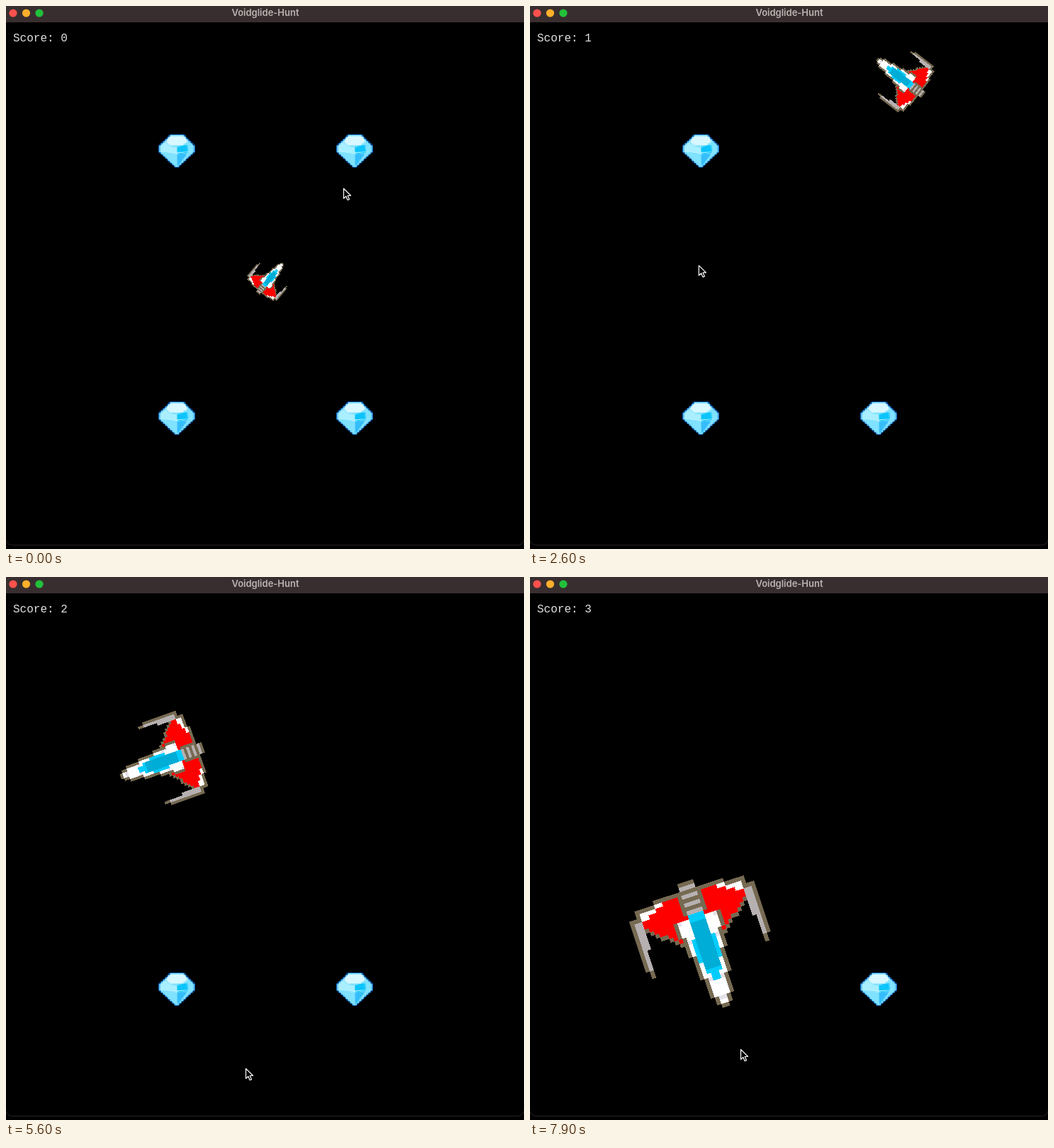
Write an HTML page with a canvas that moves like this. It is 731 px wide and 766 px high and loops after 8 s.

```html
<!DOCTYPE html>
<html lang="en">
<head>
<meta charset="utf-8">
<title>Voidglide-Hunt</title>
<style>
html, body { margin: 0; width: 100%; height: 100%; overflow: hidden; background: #000; }
canvas { display: block; }
</style>
</head>
<body>
<canvas id="stage" width="731" height="766"></canvas>
<script>
const ctx = document.getElementById('stage').getContext('2d');
const LOOP = 8000, STEP = 100;
const SHIP = 55;      // ship size before the first pickup
const GROWTH = 1.5;   // size factor per pickup
const TURN = 6.3;     // most degrees the ship turns per step

const C = {
  edge: '#766a52', white: '#ffffff', shade: '#e6e2ea', red: '#fe0000',
  grey: '#b6b0b1', cyan: '#00ccfb', deep: '#00add6'
};

// Key points: time, x, y
const flight = [
  [0, 373, 384], [1500, 511, 178], [2500, 524, 100], [3600, 416, 127],
  [4800, 277, 263], [5600, 220, 261], [6800, 191, 372], [7900, 248, 518]
];
const pointer = [
  [0, 476, 257], [1100, 507, 205], [1500, 288, 244], [3600, 222, 428], [4800, 260, 187],
  [5100, 268, 200], [5400, 325, 670], [5600, 338, 693], [6800, 383, 643], [7900, 297, 666]
];
const gems = [204, 581].flatMap(y => [241, 492].map(x => ({ x, y })));

// Monotone cubic interpolation of one column of a key list
function ease(keys, t, col) {
  const last = keys.length - 1;
  if (t >= keys[last][0]) return keys[last][col];
  let i = 0;
  while (t >= keys[i + 1][0]) i++;
  const slope = j => (keys[j + 1][col] - keys[j][col]) / (keys[j + 1][0] - keys[j][0]);
  const tangent = j => {
    if (j === 0) return slope(0);
    if (j === last) return slope(last - 1);
    const a = slope(j - 1), b = slope(j);
    return a * b <= 0 ? 0 : 2 * a * b / (a + b);
  };
  const h = keys[i + 1][0] - keys[i][0], u = (t - keys[i][0]) / h, v = 1 - u;
  return (1 + 2 * u) * v * v * keys[i][col] + u * v * v * h * tangent(i)
    + u * u * (3 - 2 * u) * keys[i + 1][col] - u * u * v * h * tangent(i + 1);
}

const at = (keys, t) => ({ x: ease(keys, t, 1), y: ease(keys, t, 2) });

// The ship turns towards the pointer, takes gems it touches and grows
function simulate() {
  const poses = [];
  let angle = 40, left = gems;
  for (let t = 0; t < LOOP; t += STEP) {
    const ship = at(flight, t), mouse = at(pointer, t);
    if (t) {
      const aim = Math.atan2(mouse.x - ship.x, ship.y - mouse.y) * 180 / Math.PI;
      const gap = ((aim - angle + 540) % 360 + 360) % 360 - 180;
      angle += Math.max(-TURN, Math.min(TURN, gap));
    }
    const size = SHIP * GROWTH ** (gems.length - left.length);
    left = left.filter(g => Math.hypot(g.x - ship.x, g.y - ship.y) > 25 + size * 0.49);
    poses.push({ ship, mouse, angle, left });
  }
  return poses;
}

function sheet(w, h) {
  const c = document.createElement('canvas');
  c.width = w;
  c.height = h;
  return [c, c.getContext('2d')];
}

function poly(g, fill, ...pts) {
  g.beginPath();
  for (let i = 0; i < pts.length; i += 2) g.lineTo(pts[i], pts[i + 1]);
  g.closePath();
  g.fillStyle = fill;
  g.fill();
}

// Colour of a ship cell: r = row behind the nose, d = columns off the axis
function shipColour(r, d) {
  // engine
  if (r > 23 && d < (r > 29 ? 2 : 3)) return r % 2 || d === 2 ? C.edge : C.grey;

  // cockpit
  const glass = r < 9 ? 1 : r > 11 && r < 18 ? 3 : 2;
  if (r > 6 && r < 24 && d < glass) return d < 2 && r > 9 && r < 22 ? C.deep : C.cyan;

  // hull
  const half = r ? Math.round(2 + r * 0.19) : 1;
  if (r < 23 && d < half) {
    if (d === half - 1) return C.edge;
    return d === half - 2 && r % 5 === 2 ? C.shade : C.white;
  }

  // gun
  if (d > 12 && r > 11 && r < 27) {
    if (r < 19 && d === 13 || r < 14 && d === 15) return null;
    return d === 15 || r < 14 || r === 26 ? C.edge : C.grey;
  }

  // wing
  const back = d < 9 ? 29 : 28, out = 12.6 - d, front = 24.2 - out * 0.9;
  if (d > 13 || r > back || r < front - 1) return null;
  if (r === back || d === 13 || r < front) return C.edge;
  return r > 24.8 + out * 0.54 ? C.white : C.red;
}

function makeShip() {
  const [c, g] = sheet(32, 32);
  for (let r = 0; r < 32; r++) {
    for (let d = 0; d < 16; d++) {
      const fill = shipColour(r, d);
      if (!fill) continue;
      g.fillStyle = fill;
      g.fillRect(15 - d, r, 1, 1);
      g.fillRect(16 + d, r, 1, 1);
    }
  }
  return c;
}

function makeGem() {
  const [c, g] = sheet(36, 32);
  g.scale(36 / 52, 32 / 47);
  const outline = [17, 0, 36, 0, 52, 16, 52, 25, 28, 47, 24, 47, 0, 25, 0, 16];
  poly(g, '#0b62bd', ...outline);
  g.translate(26, 23.5);
  g.scale(0.93, 0.93);
  g.translate(-26, -23.5);
  poly(g, '#7fe2fe', ...outline);
  poly(g, '#d9f7ff', 17, 1, 36, 1, 43, 9, 34, 15, 16, 15, 9, 9);
  poly(g, '#a9efff', 8, 10, 16, 16, 26, 18, 26, 26, 1, 25, 1, 17);
  poly(g, '#0cc4fb', 27, 17, 42, 14, 43, 26, 27, 29);
  poly(g, '#35bdfb', 27, 29, 42, 27, 29, 45, 27, 45);
  poly(g, '#c8f6ff', 2, 24, 26, 26, 50, 23, 26, 28);
  return c;
}

const poses = simulate(), shipArt = makeShip(), gemArt = makeGem();

function drawWindow(score) {
  ctx.fillStyle = '#000';
  ctx.fillRect(0, 0, 731, 766);
  ctx.strokeStyle = '#2a2024';
  ctx.lineWidth = 1;
  ctx.beginPath();
  ctx.roundRect(-0.5, -20, 732, 780.5, 9);
  ctx.stroke();

  ctx.fillStyle = '#392e2f';
  ctx.fillRect(0, 0, 731, 23);
  ['#ff514d', '#fdb02c', '#22c13a'].forEach((fill, i) => {
    ctx.beginPath();
    ctx.arc(10 + i * 18.5, 10, 5.6, 0, 7);
    ctx.fillStyle = fill;
    ctx.fill();
  });

  ctx.textAlign = 'center';
  ctx.font = '600 13px Inter, sans-serif';
  ctx.fillStyle = '#bbb3b3';
  ctx.fillText('Voidglide-Hunt', 366, 14);
  ctx.textAlign = 'left';
  ctx.font = '16px "Liberation Mono", monospace';
  ctx.fillStyle = '#e2e2e2';
  ctx.fillText('Score: ' + score, 10, 50);
}

function drawShip({ x, y }, angle, score) {
  const size = SHIP * GROWTH ** score;
  ctx.save();
  ctx.translate(x, y);
  ctx.rotate(angle * Math.PI / 180);
  ctx.drawImage(shipArt, -size / 2, -size / 2, size, size);
  ctx.restore();
}

function drawPointer({ x, y }) {
  ctx.save();
  ctx.translate(x, y);
  poly(ctx, '#000', 0.5, 0.5, 0.5, 14.5, 3.8, 11.4, 6.1, 16.8, 8.5, 15.8, 6.2, 10.5, 10.6, 10.5);
  ctx.strokeStyle = '#fff';
  ctx.lineWidth = 1.2;
  ctx.lineJoin = 'round';
  ctx.stroke();
  ctx.restore();
}

function draw(now) {
  const { ship, mouse, angle, left } = poses[Math.floor(now % LOOP / STEP)];
  const score = gems.length - left.length;
  drawWindow(score);
  ctx.imageSmoothingEnabled = false;
  for (const g of left) ctx.drawImage(gemArt, g.x - 26, g.y - 23, 52, 47);
  drawShip(ship, angle, score);
  drawPointer(mouse);
}

let start;
function tick(now) {
  start ??= now;
  draw(now - start);
  requestAnimationFrame(tick);
}
draw(0);
requestAnimationFrame(tick);
</script>
</body>
</html>
```
